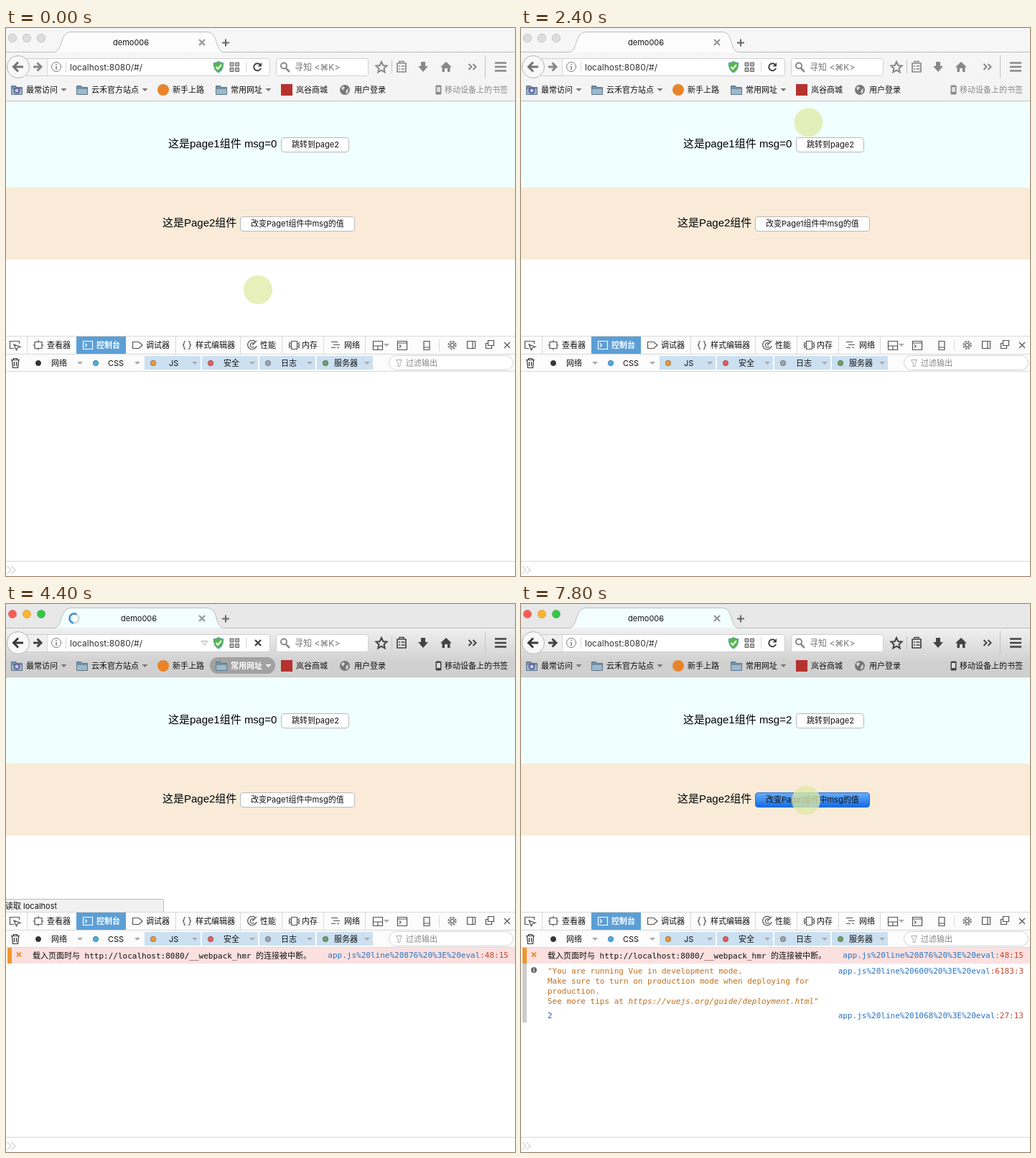
Animation of 709 by 762 pixels, one loop 8 s. Source, as an HTML page:

```html
<!DOCTYPE html>
<html lang="zh-CN">
<head>
<meta charset="utf-8">
<title>demo006</title>
<style>
html, body { margin: 0; width: 100%; height: 100%; overflow: hidden; background: #fff; }
svg {
  display: block; width: 709px; height: 762px;
  --ink: #888; --arrow: #737373; --soft: #8a8a8a; --strip: #f6f6f6; --tab: #fcfcfc;
  --nav-top: #f6f6f6; --nav-end: #f4f4f4; --close: #ddd; --mini: #ddd; --zoom: #ddd; --rim: #c6c6c6;
}
svg.focused {
  --ink: #444; --arrow: #3a3a3a; --soft: #111; --strip: #e8e8e8; --tab: #f3feff;
  --nav-top: #f0f0f0; --nav-end: #d0d0d0; --close: #fc5b57; --mini: #fdb32e; --zoom: #34c648; --rim: #0002;
}
text { font: 11px Inter, "Noto Sans CJK SC", sans-serif; fill: #111; }
.field { font-size: 12px; fill: #333; }
.page { font: 15px "Liberation Sans", "Noto Sans CJK SC", sans-serif; fill: #000; }
.log text { font: 11px "DejaVu Sans Mono", "Noto Sans CJK SC", monospace; }
.link { text-anchor: end; fill: #2674c4; }
.link tspan { fill: #c4452c; }
.line { fill: none; stroke: var(--ink); stroke-width: 2; }
.solid { fill: var(--ink); }
.thin { fill: none; stroke: #555; }
.rule { fill: none; stroke: #d9d9d9; }
.button { fill: #fff; stroke: #b9b9b9; }
.pressed .button { fill: url(#blue); stroke: #2a6fd0; }
#pill { fill: none; }
.hover #pill { fill: #a2a2a2; }
.hover text { fill: #fff; font-weight: 600; }
.hover .caret { fill: #fff; }
.caret { fill: #777; }
</style>
</head>
<body>
<svg id="stage" viewBox="0 0 709 762">
  <defs>
    <linearGradient id="nav" x2="0" y2="1">
      <stop style="stop-color:var(--nav-top)"/>
      <stop offset=".7" style="stop-color:var(--nav-end)"/>
    </linearGradient>
    <linearGradient id="blue" x2="0" y2="1"><stop stop-color="#69affa"/><stop offset="1" stop-color="#1469e3"/></linearGradient>
    <g id="folder">
      <path d="M.5 3V1.5h6l1.5 2h7.5v10H.5Z" fill="#7590a6" stroke="#5d7688"/>
      <path d="M1 6h14v7H1Z" fill="#9db9cc"/>
    </g>
    <path id="caret" d="M-4-2H4L0 2Z"/>
    <path id="cross" d="M-4-4 4 4M4-4-4 4"/>
    <path id="chevrons" d="M-5-4-1 0-5 4M1-4 5 0 1 4"/>
  </defs>

  <!-- title strip -->
  <rect width="709" height="34" style="fill:var(--strip)"/>
  <rect y="34" width="709" height="68" fill="url(#nav)"/>
  <g style="stroke:var(--rim)">
    <circle cx="9" cy="14" r="5.7" style="fill:var(--close)"/>
    <circle cx="29" cy="14" r="5.7" style="fill:var(--mini)"/>
    <circle cx="49" cy="14" r="5.7" style="fill:var(--zoom)"/>
  </g>
  <path d="M-1 33.5H66C80 33.5 74 5.5 91 5.5H280C297 5.5 290 33.5 304 33.5H710" style="fill:var(--tab)" stroke="#bcbcbc"/>
  <text id="title" y="24">demo006</text>
  <use href="#cross" x="273" y="20" stroke="#999" stroke-width="2.4"/>
  <path d="M301 20.5H311M306 15.5V25.5" stroke="#666" stroke-width="2"/>
  <g id="spinner" fill="none" stroke-width="2.6">
    <circle r="6.5" stroke="#d5d9dc"/>
    <circle id="spinArc" r="6.5" stroke-dasharray="22 50"/>
  </g>

  <!-- navigation -->
  <path d="M28 42.5H364Q367.500 42.500 367.500 46V63Q367.500 66.500 364 66.500H28Z" fill="#fff" stroke="#cfcfcf"/>
  <path d="M28 43H57V66H28Z" style="fill:var(--nav-top)"/>
  <path d="M57.500 43V66M334.500 46V62M83.500 46V62" class="rule"/>
  <circle cx="17" cy="54" r="15.500" fill="#f8f8f8" stroke="#b4b4b4"/>
  <g fill="none" style="stroke:var(--arrow)" stroke-width="3">
    <path d="M24 54H11M17 47.500 10.500 54 17 60.500"/>
    <path d="M38 54H49M43.500 48.500 49 54 43.500 59.500" style="stroke:var(--ink)"/>
  </g>
  <circle cx="70" cy="54" r="6.500" fill="none" stroke="#777"/>
  <path d="M70 50V51.500M70 53V58" stroke="#777" stroke-width="1.500"/>
  <text class="field" x="89" y="59">localhost:8080/#/</text>
  <path id="history" d="M272 51.500H281L276.500 57.500Z" fill="#eee" stroke="#bbb"/>
  <path d="M296 46.500Q299 48.500 302.500 48.500C303 56 300 60 296 62C292 60 289 56 289.500 48.500Q293 48.500 296 46.500Z" fill="#55b848" stroke="#5b92b8"/>
  <path d="M292.500 54 295 57 300 51" fill="none" stroke="#fff" stroke-width="2"/>
  <path d="M312 48h5v5h-5ZM319.500 48h5v5h-5ZM312 55.500h5v5h-5ZM319.500 55.500h5v5h-5Z" fill="#bbb" stroke="#666"/>
  <g id="reload">
    <path d="M354 51A5 5 0 1 0 355 56" fill="none" stroke="#444" stroke-width="2"/>
    <path d="M356 48V53.500H350.500Z" fill="#444"/>
  </g>
  <use id="stop" href="#cross" x="351" y="54" stroke="#444" stroke-width="2.400"/>
  <rect x="376.500" y="42.500" width="128" height="24" rx="3" fill="#fff" stroke="#cfcfcf"/>
  <path d="M390 56 395 61" stroke="#888" stroke-width="2.500"/>
  <circle cx="387" cy="52.500" r="4" fill="none" stroke="#888" stroke-width="2"/>
  <text class="field" x="402" y="59" style="fill:#777">寻知 &lt;⌘K&gt;</text>
  <g class="line">
    <path d="M523 47 525.300 52 530.500 52.500 526.500 56.200 527.700 61.500 523 58.700 518.300 61.500 519.500 56.200 515.500 52.500 520.700 52Z"/>
    <path d="M545 49H557V61H545ZM548 48V46.500H554V48M547 53H549M550.500 53H555.500M547 57H549M550.500 57H555.500" stroke-width="1.700"/>
    <use href="#chevrons" x="649.500" y="54"/>
    <path d="M681 48.500H697M681 54H697M681 59.500H697" stroke-width="2.600"/>
  </g>
  <path class="solid" d="M578 47H584V53H588L581 61 574 53H578ZM613 47 621 54.500H618.500V61H615V56H611V61H607.500V54.500H605Z"/>
  <path d="M537.500 45V63M667.500 38V70" stroke="#c4c4c4"/>

  <!-- bookmarks -->
  <use href="#folder" x="7" y="79"/>
  <circle cx="15" cy="87" r="3.500" fill="#c8c8f0" stroke="#5c5c96" stroke-width="2"/>
  <text x="28" y="90">最常访问</text><use href="#caret" class="caret" x="80.500" y="86"/>
  <use href="#folder" x="98" y="79"/>
  <text x="119" y="90">云禾官方站点</text><use href="#caret" class="caret" x="193.500" y="86"/>
  <circle cx="219" cy="86" r="8" fill="#e8832a"/><text x="232" y="90">新手上路</text>
  <g id="common">
    <rect id="pill" x="284" y="74" width="91" height="23" rx="11.500"/>
    <use href="#folder" x="292" y="79"/>
    <text x="313" y="90">常用网址</text><use href="#caret" class="caret" x="365.500" y="86"/>
  </g>
  <path d="M383 78H399V94H383Z" fill="#b6322f"/><text x="404" y="90">岚谷商城</text>
  <circle cx="472" cy="86" r="7" fill="#777"/>
  <path d="M467 83 470 81 472 83 469 87ZM474 86 477 84 476 90 473 91Z" fill="#ddd"/>
  <text x="485" y="90">用户登录</text>
  <rect x="598.500" y="79.500" width="8" height="13" rx="1.500" style="fill:var(--ink)"/>
  <path d="M600 82H605V89H600Z" fill="#ddd"/>
  <text x="611" y="90" style="fill:var(--soft)">移动设备上的书签</text>
  <path d="M0 101.500H709" stroke="#c2c2c2"/>

  <!-- page -->
  <rect y="102" width="709" height="120" fill="#f0ffff"/>
  <rect y="222" width="709" height="100" fill="#f9ebd8"/>
  <text class="page" x="226" y="166">这是page1组件 msg=<tspan id="msg">0</tspan></text>
  <rect class="button" x="383.500" y="152.500" width="94" height="20" rx="3.500"/>
  <text x="398" y="166">跳转到page2</text>
  <text class="page" x="218" y="276">这是Page2组件</text>
  <g id="change">
    <rect class="button" x="326.500" y="262.500" width="159" height="20" rx="3.500"/>
    <text x="341" y="276">改变Page1组件中msg的值</text>
  </g>
  <g id="status">
    <path d="M-1 410.500H217Q219.500 410.500 219.500 413V429H-1Z" fill="#f1f1f1" stroke="#bbb"/>
    <text id="statusText" x="-1" y="424"></text>
  </g>

  <!-- developer tools -->
  <rect y="429" width="709" height="48" fill="#fcfcfc"/>
  <path class="rule" d="M0 428.500H709M0 453.500H709M0 477.500H709M0 741.500H709M29.500 429V453M236.500 429V453M326.500 429V453M384.500 429V453M442.500 429V453M500.500 429V453M603.500 433V449"/>
  <rect x="98" y="429" width="69" height="24" fill="#5c9fd6"/>
  <g class="thin" stroke-width="1.200">
    <path d="M11 445.500H5.500V435.500H18.500V439M11 440 20 443.500 16 444.500 14.500 448Z"/>
    <path d="M40 436.500H50V445.500H40ZM45 434V436M45 446V448M37.500 441H40M50 441H52.500"/>
    <path d="M107.500 435.500H120.500V446.500H107.500ZM110 438.500 112.500 441 110 443.500" stroke="#fff"/>
    <path d="M176.500 436.500H185L190 441 185 445.500H176.500Z"/>
    <path d="M250 435.500Q248 435.500 248 438 248 441 246 441 248 441 248 444 248 446.500 250 446.500M254 435.500Q256 435.500 256 438 256 441 258 441 256 441 256 444 256 446.500 254 446.500"/>
    <path d="M348 437A6.300 6.300 0 1 0 349 442M346 439A3.200 3.200 0 1 0 346 443M343 441 349 435"/>
    <path d="M397.500 435.500H405.500V446.500H397.500ZM394 437 396 439 394 441 396 443 394 445M409 437 407 439 409 441 407 443 409 445"/>
    <path d="M453 436.500H462M456 440.500H465M453 444.500H459M461 444.500H464"/>
    <path d="M511.500 435.500H524.500V447.500H511.500ZM511.500 442H524.500M518 442V447M545.500 435.500H558.500V447.500H545.500ZM545.500 438H558.500M548 440.500 550 442.500 548 444.500"/>
    <path d="M582 435.500H590V447.500H582ZM582 444H590"/>
    <circle cx="621.500" cy="441" r="5" stroke-dasharray="2.600 1.300" stroke-width="2.500" stroke="#888"/>
    <circle cx="621.500" cy="441" r="2.500"/>
    <path d="M642.500 435.500H653.500V445.500H642.500ZM650 436V445M671.500 434.500H679.500V441.500H671.500ZM671 438.500H668.500V445.500H676.500V442"/>
    <use href="#cross" x="698" y="441"/>
    <path d="M7 461.500H19M10.500 461V459.500H15.500V461M8.500 462 9.500 472.500H16.500L17.500 462M11.500 464V470M14.500 464V470" stroke="#333"/>
  </g>
  <use href="#caret" x="530" y="441" fill="#aaa"/>
  <g id="tabs"></g>
  <g id="filters"></g>
  <rect x="533.500" y="455.500" width="173" height="20" rx="10" fill="#fff" stroke="#d0d0d0"/>
  <path d="M543.500 461.500H551.500L549 466V470.500H546V466Z" fill="none" stroke="#aaa"/>
  <text x="557" y="470" style="fill:#858585">过滤输出</text>
  <path d="M1.500 748 7 753.500 1.500 759M7.500 748 13 753.500 7.500 759" fill="none" stroke="#b5b5b5"/>

  <!-- console -->
  <g class="log" id="lostRow">
    <rect x="2" y="478" width="707" height="22" fill="#fbe0e0"/>
    <rect x="2" y="478" width="6" height="22" fill="#f0962e"/>
    <path d="M15 484.500 21 490.500M21 484.500 15 490.500" stroke="#ec8f2c" stroke-width="2"/>
    <text x="37" y="493">载入页面时与 http://localhost:8080/__webpack_hmr 的连接被中断。</text>
    <text class="link" x="700" y="492">app.js%20line%20876%20%3E%20eval<tspan>:48:15</tspan></text>
  </g>
  <g class="log" id="tipRow">
    <rect x="2" y="500" width="6" height="62" fill="#cbcbcb"/>
    <circle cx="18" cy="509" r="4" fill="#666"/>
    <path d="M18 506.500V507.700M18 508.500V511.500" stroke="#fff" stroke-width="1.300"/>
    <g style="--c:#bd6f21">
      <text x="37" y="514" style="fill:var(--c)">"You are running Vue in development mode.</text>
      <text x="37" y="528" style="fill:var(--c)">Make sure to turn on production mode when deploying for</text>
      <text x="37" y="542" style="fill:var(--c)">production.</text>
      <text x="37" y="556" style="fill:var(--c)">See more tips at <tspan font-style="italic">https://vuejs.org/guide/deployment.html</tspan>"</text>
    </g>
    <text class="link" x="700" y="514">app.js%20line%20600%20%3E%20eval<tspan>:6183:3</tspan></text>
  </g>
  <g class="log" id="valueRow">
    <rect x="2" y="562" width="6" height="20" fill="#cbcbcb"/>
    <text x="37" y="576" style="fill:#2b5cc9">2</text>
    <text class="link" x="700" y="576">app.js%20line%201068%20%3E%20eval<tspan>:27:13</tspan></text>
  </g>

  <circle id="pointer" r="20" fill="#e0eba6" fill-opacity=".77"/>
</svg>
<script>
const LOOP = 8000, STEP = 200;
const el = id => document.getElementById(id);
const show = (id, on) => el(id).style.display = on ? '' : 'none';

const tabs = [['查看器', 57], ['控制台', 126], ['调试器', 195], ['样式编辑器', 264], ['性能', 354], ['内存', 412], ['网络', 471]];
el('tabs').innerHTML = tabs.map(([label, x]) =>
  `<text x="${x}" y="445"${x === 126 ? ' style="fill:#fff;font-weight:bold"' : ''}>${label}</text>`).join('');

const filters = [['网络', 63, '#333'], ['CSS', 142, '#45aee8'], ['JS', 227, '#f19a35'],
  ['安全', 303, '#ec5a5a'], ['日志', 383, '#a5a5a5'], ['服务器', 457, '#72a065']];
el('filters').innerHTML = filters.map(([label, textX, color], i) => {
  const x = 33 + 80 * i;
  return (i > 1 ? `<rect x="${x}" y="456" width="78" height="19" fill="#cbe0f1"/>` : '') +
    `<circle cx="${x + 12}" cy="466" r="3.700" fill="${color}" stroke="#0005"/>
     <text x="${textX}" y="470">${label}</text>
     <use href="#caret" x="${x + 70}" y="466" fill="#aaa"/>`;
}).join('');

// time, x, y
const path = [[0, 351, 364], [1400, 414, 163], [1800, 417, 160], [2000, 417, 160], [3200, 353, 49],
  [4000, 353, 49], [4200, 392, 158], [5400, 397, 273], [LOOP, 397, 273]];

function pointerAt(t) {
  const i = path.findIndex(key => key[0] > t);
  const [t0, x0, y0] = path[i - 1], [t1, x1, y1] = path[i];
  const p = (t - t0) / (t1 - t0), e = p * p * (3 - 2 * p);
  return [x0 + (x1 - x0) * e, y0 + (y1 - y0) * e];
}

function draw() {
  const t = Math.floor(performance.now() % LOOP / STEP) * STEP;
  const between = (from, to) => t >= from && t < to;
  const loading = between(4000, 4800), reading = t >= 4400;

  el('stage').classList.toggle('focused', t >= 4000);
  el('pointer').setAttribute('transform', `translate(${pointerAt(t)})`);
  show('pointer', t !== 4400);

  el('title').setAttribute('x', loading ? 160 : 149);
  show('spinner', loading);
  el('spinner').setAttribute('transform', `translate(95 20) rotate(${reading ? 100 + (t - 4400) * .6 : -75 - (t - 4000) * .3})`);
  el('spinArc').setAttribute('stroke', reading ? '#3d97dc' : '#777');
  el('spinArc').setAttribute('stroke-dasharray', reading ? '22 50' : '7 50');
  show('reload', !loading);
  show('stop', loading);
  show('history', between(2800, 4800));
  show('status', loading);
  el('statusText').textContent = reading ? '读取 localhost' : '等待 localhost...';
  el('common').classList.toggle('hover', between(4200, 4600));

  el('change').classList.toggle('pressed', between(6400, 6600) || t >= 7800);
  el('msg').textContent = t >= 6600 ? 2 : 0;
  show('lostRow', reading);
  show('tipRow', t >= 6000);
  show('valueRow', t >= 6600);
  requestAnimationFrame(draw);
}
draw();
</script>
</body>
</html>
```
